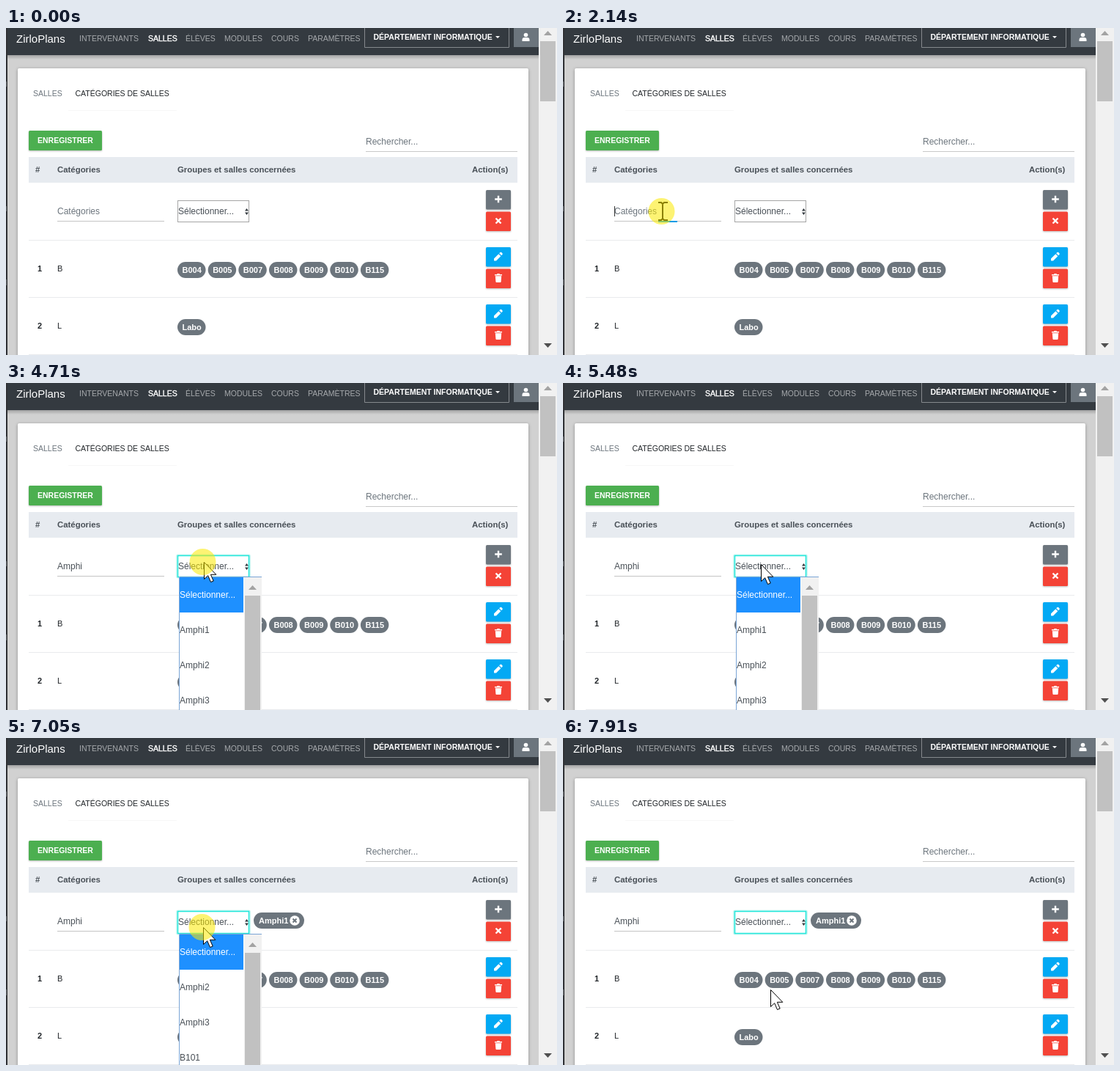
Recreate the animation shown at these times as an HTML page. Size 752 by 446 pixels, loop 8000 ms.

```html
<!DOCTYPE html>
<html lang="fr">
<head>
<meta charset="utf-8">
<title>Catégories de salles</title>
<style>
html, body { margin: 0; width: 100%; height: 100%; overflow: hidden; }
svg { display: block; width: 752px; height: 446px; font: 12px "Liberation Sans", Arial, sans-serif; }
.small { font-size: 10.5px; }
.head { font: bold 11.4px "Liberation Sans", Arial, sans-serif; fill: #495057; }
.cell { font-size: 11px; fill: #212529; }
.bold { font-weight: bold; }
.badge { font: bold 11px "Liberation Sans", Arial, sans-serif; fill: #fff; }
.nav { fill: #a6a9ac; }
.current { fill: #fff; stroke: #fff; stroke-width: .4px; }
.muted { fill: #6c757d; }
.input { fill: #495057; }
.button { filter: drop-shadow(0 1px 1px #0004); }
#beam { mix-blend-mode: difference; }
</style>
</head>
<body>
<svg viewBox="0 0 752 446">
  <defs>
    <linearGradient id="shade" x2="0" y2="1">
      <stop stop-color="#000" stop-opacity=".22"/><stop offset="1" stop-color="#000" stop-opacity="0"/>
    </linearGradient>
    <path id="plus" d="M6 1.2V10.8M1.2 6H10.8" stroke="#fff" stroke-width="2.4"/>
    <path id="cross" d="M2.5 2.5L9.5 9.5M9.5 2.5L2.5 9.5" stroke="#fff" stroke-width="2.4"/>
    <path id="pencil" d="M0 9L6.3 2.7L9.3 5.7L3 12H0ZM7.2 1.8L8.4 .6Q9.3 -.2 10.2 .6L11.4 1.8Q12.2 2.7 11.4 3.6L10.2 4.8Z" fill="#fff"/>
    <path id="trash" d="M1 1H4L4.6 0H7.4L8 1H11V2.4H1ZM1.8 3.3H10.2L9.6 11Q9.5 12 8.6 12H3.4Q2.5 12 2.4 11Z" fill="#fff"/>
  </defs>

  <rect width="752" height="446" fill="#d1d1d1"/>
  <rect width="2" height="446" fill="#303236"/>
  <path d="M0 73h1v7H0zM0 243h1v7H0zM0 343h1v8H0z" fill="#6a6d71"/>

  <g class="small">
    <rect x="2" width="725" height="37" fill="#343a40"/>
    <rect x="2" y="37" width="725" height="6" fill="url(#shade)"/>
    <text x="14" y="20" font-size="15" fill="#fff">ZirloPlans</text>
    <g class="nav">
      <text x="100" y="18">INTERVENANTS</text>
      <text x="194" y="18" class="current">SALLES</text>
      <text x="245" y="18">ÉLÈVES</text>
      <text x="298" y="18">MODULES</text>
      <text x="362" y="18">COURS</text>
      <text x="412" y="18">PARAMÈTRES</text>
    </g>
    <path d="M489.500 0V26.500H686.500V0" fill="none" stroke="#85898d"/>
    <text x="501.500" y="16" class="bold" fill="#fff">DÉPARTEMENT INFORMATIQUE</text>
    <path d="M668 11h6l-3 3z" fill="#fff"/>
    <rect x="693" width="34" height="26" fill="#6c757d"/>
    <circle cx="709.500" cy="9.500" r="2.800" fill="#fff"/>
    <path d="M704.500 18v-2q0-3 3-3h4q3 0 3 3v2z" fill="#fff"/>
  </g>

  <rect x="727" width="25" height="446" fill="#f1f1f1"/>
  <rect x="729" y="18" width="21" height="82" fill="#c1c1c1"/>
  <path d="M734 10l5.500-6 5.500 6z" fill="#a3a3a3"/>
  <path d="M734 430h11l-5.500 6z" fill="#505050"/>

  <rect x="16" y="55" width="697" height="400" rx="2" fill="#fff" style="filter:drop-shadow(0 1px 2px #0005)"/>
  <text x="37" y="93" class="small muted">SALLES</text>
  <text x="94.500" y="93" class="small" fill="#212529">CATÉGORIES DE SALLES</text>
  <path d="M85 112.500H233" stroke="#f7f7f7"/>
  <rect x="31" y="140" width="100" height="27" rx="1.500" fill="#4caf50" class="button"/>
  <text x="43" y="157" class="small bold" fill="#fff">ENREGISTRER</text>
  <text x="491" y="159" class="muted">Rechercher...</text>
  <path d="M491 168.500H698" stroke="#c8c8c8"/>

  <rect x="31" y="176" width="667" height="35" fill="#e7ebf0"/>
  <g class="head">
    <text x="40" y="197">#</text>
    <text x="70" y="197">Catégories</text>
    <text x="234" y="197">Groupes et salles concernées</text>
    <text x="636" y="197">Action(s)</text>
  </g>
  <path d="M31 289.500H698M31 367.500H698M31 445.500H698" stroke="#e9ebed"/>
  <g class="cell">
    <text x="43" y="332" class="bold">1</text><text x="70" y="332">B</text>
    <text x="43" y="410" class="bold">2</text><text x="70" y="410">L</text>
  </g>
  <g id="buttons"></g>
  <g id="badges" class="badge"></g>

  <path d="M70 263.500H216" stroke="#c4c4c4"/>
  <rect id="underline" y="263" height="2" fill="#039be5"/>
  <text id="field" x="70" y="254"></text>
  <rect id="caret" y="243" width="1" height="14" fill="#333"/>

  <g id="select">
    <rect id="glow" x="234" y="235.500" width="98" fill="none" stroke="#40e0d0" stroke-width="4" opacity=".3" rx="1"/>
    <rect id="box" x="234.500" y="235.500" width="97" fill="#fff"/>
    <text x="235" y="254" class="input">Sélectionner...</text>
    <path d="M326 249.500h5l-2.500-3.500zM326 251.500h5l-2.500 3.500z" fill="#343a40"/>
  </g>
  <g id="chosen" class="badge">
    <rect x="338" y="238" width="69" height="22" rx="11" fill="#6c757d"/>
    <text x="345" y="253">Amphi1</text>
    <circle cx="394" cy="249" r="6.800" fill="#fff"/>
    <path d="M391.500 246.500l5 5m0-5l-5 5" stroke="#6c757d" stroke-width="2"/>
  </g>

  <g id="menu">
    <rect x="236" width="113" height="220" fill="#fff"/>
    <rect id="hover" x="237" width="87" height="48" fill="#1e90ff"/>
    <g id="options"></g>
    <rect x="325" y="1" width="24" height="220" fill="#f1f1f1"/>
    <rect x="326" y="26" width="21" height="200" fill="#c1c1c1"/>
    <path d="M331 18l5.500-6 5.500 6z" fill="#a3a3a3"/>
    <path d="M236.500 220V.5H349" fill="none" stroke="#7aa5d6"/>
  </g>

  <path id="beam" d="M-6-12H-2L0-10L2-12H7M-6 12H-2L0 10L2 12H7M0-11V11" fill="none" stroke="#fff" stroke-width="2"/>
  <path id="arrow" d="M.5.500V23.500L5.700 18.700L9.500 27.500L13.200 26L9.400 17.300H16.800Z" fill="#fff" stroke="#000"/>
  <circle id="click" r="18" fill="#fbea00" opacity=".55"/>
</svg>
<script>
const $ = id => document.getElementById(id);
const set = (id, attrs) => { for (const k in attrs) $(id).setAttribute(k, attrs[k]); };
const show = (id, on) => { $(id).style.display = on ? "" : "none"; };
const between = (t, a, b) => t >= a && t < b;

const button = (y, color, icon) =>
  `<rect class="button" x="655" y="${y}" width="34" height="26.500" rx="1.500" fill="${color}"/>
   <use href="#${icon}" x="666" y="${y + 6.5}"/>`;
const badge = (x, y, label) =>
  `<rect x="${x}" y="${y}" width="38.500" height="22" rx="11" fill="#6c757d"/>
   <text x="${x + 6.5}" y="${y + 15}">${label}</text>`;

const red = "#f44336", blue = "#03a9f4";
$("buttons").innerHTML = button(221, "#6c757d", "plus") + button(250.5, red, "cross") +
  [299, 377].map(y => button(y, blue, "pencil") + button(y + 29.5, red, "trash")).join("");
$("badges").innerHTML = ["B004", "B005", "B007", "B008", "B009", "B010", "B115"]
  .map((name, i) => badge(234 + i * 41.65, 319, name)).join("") + badge(234, 397, "Labo");

// Pointer moves: first step, last step, number of steps, destination
const moves = [
  [430, 590, 3, 286, 345], [900, 900, 1, 220, 345], [1070, 1680, 9, 136, 250],
  [4120, 4270, 3, 205, 243], [4350, 4550, 3, 270, 244], [5480, 5860, 6, 268, 333],
  [6030, 6190, 3, 268, 336], [6420, 6590, 3, 268, 263], [6740, 6890, 3, 269, 258],
  [7130, 7680, 8, 283, 343]
];
const clicks = [[2140, 2300], [4710, 4860], [6030, 6190], [7050, 7210], [7830, 7910]];
const keys = [2840, 2920, 3070, 3390, 3470];
const word = "Amphi";
const caretX = [70, 78, 88, 95, 101, 103];
const pickTime = 6190;

const smooth = p => p * p * p * (10 + p * (6 * p - 15));
const stepped = (t, a, b, n) =>
  t < a ? 0 : t >= b ? n : 1 + Math.floor((t - a) / (b - a) * (n - 1) + 1e-6);

function pointer(t) {
  let x = 507, y = 394;
  for (const [a, b, n, toX, toY] of moves) {
    const p = smooth(stepped(t, a, b, n) / n);
    x += (toX - x) * p;
    y += (toY - y) * p;
  }
  return [Math.round(x), Math.round(y)];
}

// The focus line grows from the middle, easing out over 300 ms
function underlineWidth(t) {
  if (!between(t, 2140, 4710)) return 0;
  const elapsed = 28 + 80 * (stepped(t, 2140, 2460, 5) - 1);
  return 146 * (1 - (1 - Math.min(1, elapsed / 300)) ** 2);
}

let shownList = "";
function drawMenu(picked, y) {
  const top = picked ? 267 : 264;
  const list = ["Sélectionner...", ...(picked ? [] : ["Amphi1"]), "Amphi2", "Amphi3", "B101"];
  const active = Math.max(0, Math.floor((y - top - 1) / 48));
  const key = list.length + ":" + active;
  set("menu", { transform: `translate(0 ${top})` });
  set("hover", { y: 1 + active * 48 });
  if (key === shownList) return;
  shownList = key;
  $("options").innerHTML = list.map((label, i) =>
    `<text x="237" y="${29 + i * 48}" fill="${i === active ? "#fff" : "#495057"}">${label}</text>`).join("");
}

function render(t) {
  const [x, y] = pointer(t);
  const open = between(t, 4710, 6110) || between(t, 7050, 7910);
  const focused = t >= 4710, picked = t >= pickTime;

  const typed = keys.filter(k => t >= k).length;
  $("field").textContent = typed ? word.slice(0, typed) : "Catégories";
  $("field").setAttribute("class", typed ? "input" : "muted");
  set("caret", { x: caretX[typed] });
  show("caret", between(t, 2140, 2690) || between(t, 2840, 4030) || between(t, 4550, 4710));

  const line = underlineWidth(t);
  set("underline", { x: 143 - line / 2, width: line });

  const height = picked ? 30 : 29;
  set("select", { transform: `translate(0 ${picked ? 1 : 0})` });
  set("box", { height, stroke: focused ? "#22e6da" : "#a5a5a5", "stroke-width": focused ? 1.5 : 1 });
  set("glow", { height });
  show("glow", focused);
  show("chosen", picked);

  show("menu", open);
  if (open) drawMenu(picked, y);

  const overInput = between(x, 66, 218) && between(y, 235, 268);
  const overBadges = !open && between(x, 234, 522) && between(y, 319, 341);
  const beam = overInput || overBadges;
  show("beam", t >= 350 && beam);
  show("arrow", t >= 350 && !beam);
  for (const id of ["beam", "arrow"]) set(id, { transform: `translate(${x} ${y})` });
  set("click", { cx: x - 1.5, cy: y });
  show("click", clicks.some(([a, b]) => between(t, a, b)));
}

function tick() {
  render(performance.now() % 8000);
  requestAnimationFrame(tick);
}
tick();
</script>
</body>
</html>
```
